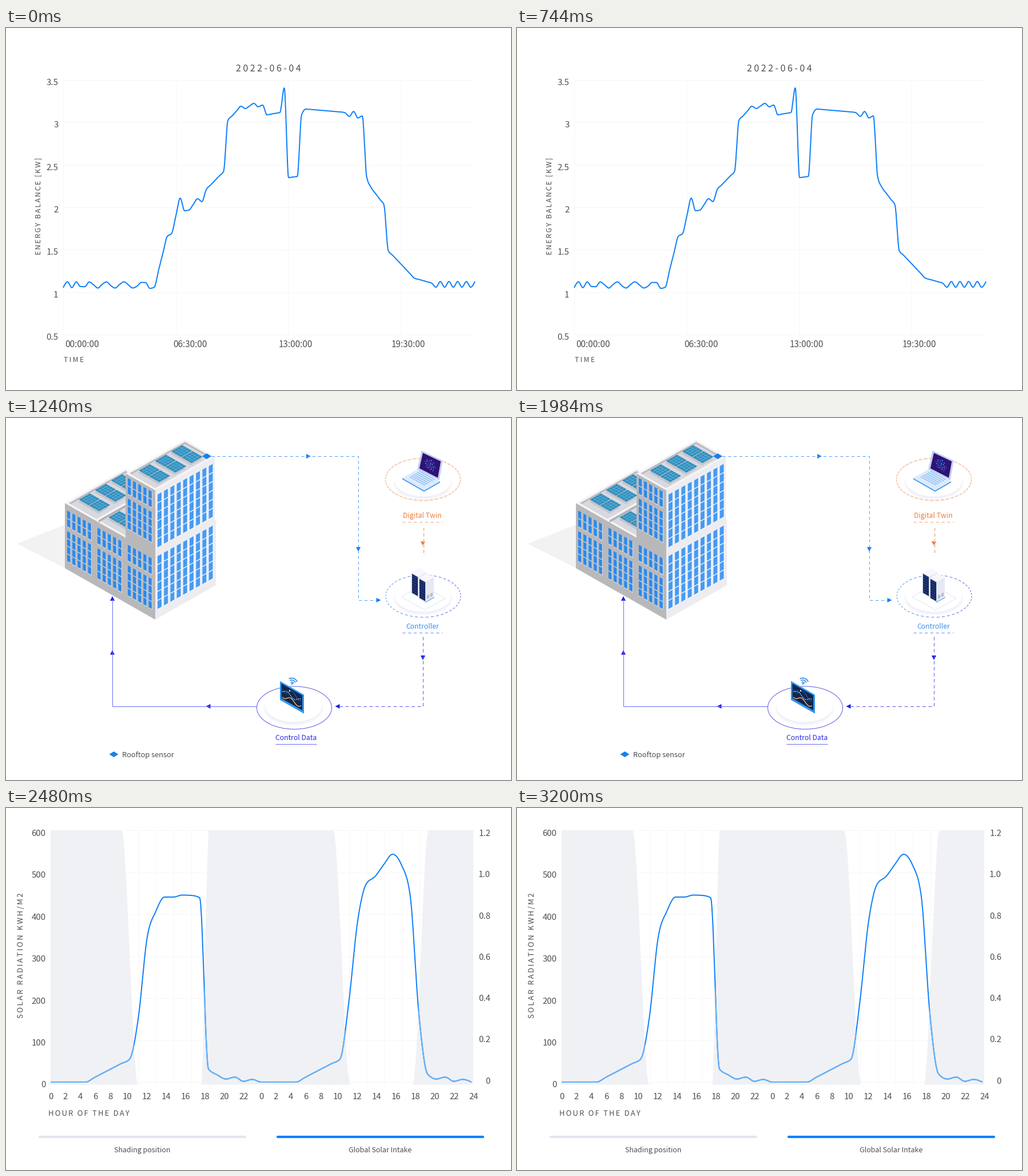
These frames come from a looping animation (883 by 634 pixels, 3.68 s). A matplotlib script:

```python
import math

import numpy as np
import matplotlib.pyplot as plt
from matplotlib.animation import FuncAnimation
from matplotlib.collections import LineCollection, PolyCollection
from matplotlib.patches import Ellipse, PathPatch, Polygon
from matplotlib.path import Path
from matplotlib.textpath import TextPath
from matplotlib.transforms import Affine2D

W, H, DPI = 883, 634, 100
STEP_MS, FRAMES = 40, 92
CUTS = (31, 62)          # first frame of the second and third scene
PT = 72 / DPI            # points per pixel
ISO = 0.57               # slope of the slanted edges
FONT = "Noto Sans CJK JP"
INK, GRID = "#4f4f4f", "#f6f6f7"
BLUE, SKY, INDIGO, ORANGE = "#0f80fa", "#4f9ff2", "#2a2ae4", "#ee8a50"

plt.rcParams["font.family"] = FONT
plt.rcParams["font.weight"] = "light"
fig = plt.figure(figsize=(W / DPI, H / DPI), dpi=DPI, facecolor="white")


def scene():
    ax = fig.add_axes([0, 0, 1, 1])
    ax.set_xlim(0, W)
    ax.set_ylim(H, 0)
    ax.axis("off")
    return ax


# ---------- helpers ----------

def line(ax, pts, color, w=1.0, dash=None, cap="butt", **kw):
    x, y = zip(*pts)
    style = "-" if dash is None else (0, tuple(d / w for d in dash))
    return ax.plot(x, y, color=color, lw=w * PT, ls=style, dash_capstyle=cap,
                   solid_capstyle=cap, solid_joinstyle="round", **kw)[0]


def poly(ax, pts, color, edge="none", w=0.0):
    ax.add_patch(Polygon(pts, closed=True, fc=color, ec=edge, lw=w * PT,
                         joinstyle="round"))


def oval(ax, x, y, w, h, color, **kw):
    ax.add_patch(Ellipse((x, y), w, h, fc=color, lw=0, **kw))


def label(ax, x, y, text, size=15, ha="left", color=INK):
    ax.text(x, y, text, fontsize=size * PT, ha=ha, va="baseline", color=color)


def spaced(ax, x, y, text, size, gap, upright=False):
    """Letter-spaced text starting at the baseline point (x, y)."""
    prop = {"family": FONT, "weight": "light"}

    def reach(s):
        return TextPath((0, 0), s + "|", size=size, prop=prop).get_extents().x1

    place = Affine2D().scale(1, -1)
    if upright:
        place.rotate_deg(-90)
    place.translate(x, y)
    for i, ch in enumerate(text):
        if ch == " ":
            continue
        at = reach(text[:i]) - reach("") + i * gap
        glyph = TextPath((at, 0), ch, size=size, prop=prop)
        ax.add_patch(PathPatch(place.transform_path(glyph), fc=INK, lw=0, snap=False))


def monotone(x, y, n=14):
    """Monotone cubic curve through the points."""
    x, y = np.asarray(x, float), np.asarray(y, float)
    h, s = np.diff(x), np.diff(y) / np.diff(x)
    p = (s[:-1] * h[1:] + s[1:] * h[:-1]) / (h[:-1] + h[1:])
    m = (np.sign(s[:-1]) + np.sign(s[1:])) * np.minimum(
        np.minimum(abs(s[:-1]), abs(s[1:])), 0.5 * abs(p))
    m = np.r_[(3 * s[0] - m[0]) / 2, m, (3 * s[-1] - m[-1]) / 2]
    t = np.linspace(0, 1, n, endpoint=False)[None, :]
    a, b, d = y[:-1, None], y[1:, None], h[:, None]
    ys = (a * (1 + 2 * t) * (1 - t) ** 2 + d * m[:-1, None] * t * (1 - t) ** 2
          + b * t * t * (3 - 2 * t) + d * m[1:, None] * t * t * (t - 1))
    xs = x[:-1, None] + d * t
    return list(zip(np.r_[xs.ravel(), x[-1]], np.r_[ys.ravel(), y[-1]]))


def arrow(ax, x, y, turn, color, r=4.0):
    """Triangle pointing right, turned clockwise by quarter turns."""
    c, s = math.cos(turn * math.pi / 2), math.sin(turn * math.pi / 2)
    pts = [(r, 0), (-r, r), (-r, -r)]
    poly(ax, [(x + a * c - b * s, y + a * s + b * c) for a, b in pts], color)


RIGHT, DOWN, LEFT, UP = range(4)


# ---------- energy balance chart ----------

def balance():
    """Height of the curve at each quarter of an hour."""
    q = np.arange(96)
    keys = [(20, 456), (21, 454), (24, 365), (25, 360), (27, 298), (28, 320),
            (29, 319), (31, 299), (32, 304), (33, 283), (37, 251), (38, 162),
            (41, 137), (42, 141), (44, 132), (45, 138), (46, 135), (47, 152),
            (50, 148), (51, 105), (52, 262), (54, 260), (55, 152), (56, 142),
            (64, 147), (69, 154), (70, 260), (71, 279), (74, 310), (75, 390),
            (81, 438), (86, 449)]
    base = np.interp(q, *zip(*keys))
    night = 450 - 5.5 * np.cos(2 * np.pi * 0.585 * abs(q - 1) ** 0.75)
    flicker = 5 * (-1.0) ** q * ((q > 85) | (q > 65) & (q < 69))
    return np.where(q < 20, night, base + flicker)


def energy_chart():
    ax = scene()
    for i in range(4):
        x = 100 + 196.7 * i
        line(ax, [(x, 91), (x, 537)], GRID)
        hours = 6.5 * i
        text = f"{int(hours):02d}:{int(hours % 1 * 60):02d}:00"
        label(ax, x + 3.5 - 8 * (i > 0) - 12 * (i > 1), 559, text, 15.2)
    for i in range(7):
        y = 91 + 74.3 * i
        line(ax, [(100, y), (820, y)], GRID)
        label(ax, 91.5, y + 9, f"{3.5 - 0.5 * i:g}", ha="right")
    spaced(ax, 402, 76, "2022-06-04", 16, 3.5)
    spaced(ax, 60, 398, "ENERGY BALANCE [KW]", 12.3, 2.1, upright=True)
    spaced(ax, 101, 585, "TIME", 12, 2.5)
    ys = balance()
    line(ax, monotone(np.linspace(100, 820, len(ys)), ys), BLUE, 2)
    return ax


# ---------- solar radiation chart ----------

def shade(left, right):
    """Shaded block; each side is (top x, bottom x)."""
    top, low = 39, 484.5
    (lt, lb), (rt, rb) = left, right
    dl, dr = (lb - lt) / 3, (rb - rt) / 3
    pts = [(lt, top), (rt, top), (rt + dr, top), (rb - dr, low), (rb, low),
           (lb, low), (lb - dl, low), (lt + dl, top), (lt, top)]
    side = [Path.LINETO] + [Path.CURVE4] * 3
    return Path(pts, [Path.MOVETO] + side + side)


def radiation():
    """Height of the curve at each hour of two days."""
    k = np.arange(5)
    night = np.full(5, 480)
    dawn = 472 - 8 * k
    dusk = 470 + 2 * k - 2.7 * (-1.0) ** k
    plateau = [368, 228, 181, 156, 156, 152.5, 153, 157, 457]
    peak = [342, 200, 133, 120, 99, 81, 99, 152, 360, 466]
    return np.r_[night, dawn, plateau, dusk, night, dawn, peak, dusk[1:], 480]


def solar_chart():
    ax = scene()
    for i in range(25):
        x = 78 + 30.7 * i
        line(ax, [(x, 39), (x, 484)], GRID)
    for i in range(7):
        y = 39 + 73.5 * i
        line(ax, [(78, y), (817, y)], GRID)
        label(ax, 69.5, 49 + 73.4 * i, str(600 - 100 * i), ha="right")
        text = f"{1.2 - 0.2 * i:.1f}" if i < 6 else "0"
        label(ax, 847, 49 + 72.3 * i, text, ha="right")

    x, before = 78, None
    for hour in [*range(0, 24, 2), *range(0, 25, 2)]:
        wide = 17 if hour > 9 else 9
        if before:
            x += 17 + (before + wide) / 2
        label(ax, x, 510, str(hour), ha="center")
        before = wide
    spaced(ax, 29, 369, "SOLAR RADIATION KWH/M2", 13, 2.55, upright=True)
    spaced(ax, 74, 539, "HOUR OF THE DAY", 13, 2.2)

    ys = radiation()
    curve = monotone(78 + 15.33 * np.arange(len(ys)), ys)
    shades = (shade((78, 78), (202, 231)), shade((355, 341), (572, 602)),
              shade((739, 711), (817, 817)))
    line(ax, curve, BLUE, 2, zorder=3)
    for path in shades:
        ax.add_patch(PathPatch(path, fc="#eff0f4", lw=0, alpha=0.92, zorder=2.5))
        pale = line(ax, curve, "#69b1f6", 2.2, zorder=4)
        pale.set_clip_path(path, ax.transData)

    for x, color, text in ((57, "#e3e6ef", "Shading position"),
                           (473, BLUE, "Global Solar Intake")):
        line(ax, [(x + 2, 576), (x + 361, 576)], color, 4.2, cap="round")
        label(ax, x + 181.5, 603, text, 12.5, ha="center")
    return ax


# ---------- isometric shapes ----------

def wall(x, y, w, h, slope=ISO):
    """Upright face whose top edge starts at (x, y)."""
    return [(x, y), (x + w, y + slope * w), (x + w, y + slope * w + h), (x, y + h)]


def flat(x, y, a, b):
    """Level face from its left corner: a runs down right, b runs up right."""
    return [(x, y), (x + a, y + ISO * a), (x + a + b, y + ISO * (a - b)),
            (x + b, y - ISO * b)]


def box(ax, x, y, a, b, h, left, right, top):
    poly(ax, wall(x, y, a, h), left)
    poly(ax, wall(x + a, y + ISO * a, b, h, -ISO), right)
    poly(ax, flat(x, y, a, b), top)


def roof(ax, x, y, a, b, rim=3.6, drop=3):
    """Sunken roof floor behind a pale rim."""
    x, a, b = x + 2 * rim, a - 2 * rim, b - 2 * rim
    poly(ax, flat(x, y, a, b), "#b9babf")
    poly(ax, flat(x + drop, y + ISO * drop, a - drop, b - drop), "#d8d9df")


def windows(ax, x, y, n, pitch, w, h, floors, slope, color, frame):
    """Columns of windows on a slanted wall."""
    step = h / floors
    frames, panes = [], []
    for k in range(n):
        left, top = x + k * pitch, y + slope * k * pitch
        frames.append(wall(left, top, w + 1.2, h, slope))
        panes += [wall(left, top + f * step, w, step - 1.5, slope)
                  for f in range(floors)]
    for cells, fill in ((frames, frame), (panes, color)):
        ax.add_collection(PolyCollection(cells, facecolors=fill, linewidths=0, zorder=1))


def panel_pairs(ax, x, y, n):
    """Pairs of solar panels, each pair further up the roof."""
    a, b, gap = 16.5, 18.5, 18.3
    for k in reversed(range(n)):
        px, py = x + 28.3 * k, y - 16.7 * k
        poly(ax, flat(px - 2, py + 4, a + gap + 1, b), "#c3c5cd")
        for cx in (px, px + gap):
            cy = py + ISO * (cx - px)
            poly(ax, flat(cx, cy, a, b), "#2d8fc0", "#1f76a4", 0.5)
            for t in (0.25, 0.5, 0.75):
                for strip in (flat(cx, cy, a * t, b)[1:3], flat(cx, cy, a, b * t)[2:]):
                    line(ax, strip, "#7cc0de", 0.6, zorder=1)


# ---------- building and control loop ----------

def building(ax):
    grey, white, rim = "#b8b8bb", "#ededf1", "#f4f4f6"
    poly(ax, [(19, 220), (103, 187), (103, 263)], "#f2f2f2")

    box(ax, 103, 149, 158, 106, 114, grey, white, rim)
    roof(ax, 103, 149, 106, 106)
    panel_pairs(ax, 128, 143, 3)
    poly(ax, wall(158, 177, 51, 4, -ISO), rim)
    poly(ax, wall(162, 179, 47, 4, -ISO), "#b0b1b6")
    panel_pairs(ax, 180, 174, 1)

    box(ax, 209, 97, 52, 104, 226, grey, white, rim)
    roof(ax, 209, 97, 52, 104)
    panel_pairs(ax, 233, 92, 3)

    for x, y in ((107, 162), (160, 192), (213, 222), (213, 105)):
        for top, h, floors in ((y, 29, 2), (y + 36, 54, 4)):
            windows(ax, x, top, 5, 9.1, 5.4, h, floors, ISO, "#2b89eb", "#d3d3d6")
    for y in (134, 242):
        windows(ax, 265, y, 9, 11.2, 7, 94, 6, -0.555, "#479bf3", "#fafafc")


def diamond(ax, x, y):
    poly(ax, [(x - 8, y), (x, y - 5), (x + 8, y), (x, y + 5)], "#1580ee")


def disc(ax, x, y):
    for k in range(7):
        oval(ax, x, y + 4, 104 - 2 * k, 60 - 2 * k, "#cdd4f8", alpha=0.06)
    oval(ax, x, y, 98, 55, "white")


def dashed_ring(ax, x, y, start, end, w=1.0, shift=0.0, n=44):
    """Dashed ellipse whose colour runs from left to right."""
    start, end = np.array(start) / 255, np.array(end) / 255
    arcs, colors = [], []
    for k in range(n):
        t = (k + shift + np.linspace(0, 0.55, 6)) * 2 * math.pi / n
        arcs.append(np.c_[x + 65.5 * np.cos(t), y + 37 * np.sin(t)])
        mix = (1 + math.cos(t[3])) / 2
        colors.append(tuple(start + (end - start) * mix))
    ax.add_collection(LineCollection(arcs, colors=colors, linewidths=w * PT, zorder=1))


def laptop(ax):
    box(ax, 693, 105, 38, 28, 2.5, "#4fa2f2", "#4fa2f2", "#dcebfc")
    for k in range(6):
        x, y = 706 + 3.4 * k, 103 - 1.95 * k
        line(ax, [(x, y), (x + 27, y + 15)], "#7cb8f3", 1.6, dash=(2.6, 0.8), zorder=1)
    screen = np.array([(727, 58), (763, 75), (757, 108), (720, 89)])
    mid = screen.mean(axis=0)
    poly(ax, screen, "#c6d2f5", "#9fb2ea", 0.7)
    poly(ax, mid + 0.87 * (screen - mid), "#2f1274")
    for k in range(26):
        r, t = 1.9 * math.sqrt(k), 2.4 * k
        x, y = r * math.cos(t), r * math.sin(t)
        oval(ax, mid[0] + x, mid[1] + y + 0.4 * x, 2, 2,
             ("#2f7de0", "#3d4fd0", "#36b4e6")[k % 3])


def servers(ax):
    poly(ax, flat(691, 313, 41, 36), "white", "#e3e6f8", 1)
    for x, y in ((709, 271), (722, 280)):
        box(ax, x, y, 12, 14, 36, "#c9cfe6", "#e6e9f4", "#f6f7fc")
        poly(ax, wall(x + 1, y + 2, 10, 33), "#16235a")
        for k in range(7):
            top = y + 5.5 + 4.4 * k
            line(ax, [(x + 2, top), (x + 10, top + 4.5)], "#3f78c8", 0.9,
                 dash=(1.6, 1.2), zorder=1)
    for k in range(2):
        poly(ax, wall(736 + 6 * k, 311 - 3.4 * k, 4, 6, -ISO), "#b4bad0")
    line(ax, [(733, 323), (749, 314)], "#6aa9ee", 1.2, zorder=1)


def tablet(ax):
    poly(ax, wall(479.5, 461.5, 41, 32), "#2f95ee", "#2f95ee", 1)
    poly(ax, wall(481.5, 465, 36.5, 26), "#10264f")
    t = np.linspace(0, 1, 40)
    waves = ((474, 4.5, 0.2, "#3f7fd0", 0.7, None),
             (478, 3.5, 2.6, "white", 0.9, (2.2, 1.2)),
             (486, 3.5, 0.9, "#f2b56a", 1.4, None))
    for y, amp, phase, color, w, dash in waves:
        ys = y + 18 * t + amp * np.sin(8.5 * t + phase)
        line(ax, list(zip(483 + 33 * t, ys)), color, w, dash, zorder=1)
    oval(ax, 496, 477.5, 2.4, 2.4, "white")

    a = np.radians(np.linspace(-118, -22, 14))
    for r in (3.5, 7, 10.5):
        arc = zip(499.5 + r * np.cos(a), 466 + r * np.sin(a))
        line(ax, list(arc), "#2486e8", 1.6)
    oval(ax, 500, 465.5, 2.8, 2.8, "#2486e8")


def caption(ax, x, y, text, color, rule, half, dash=None):
    label(ax, x, y, text, 12.2, "center", color)
    line(ax, [(x - half, y + 6.5), (x + half, y + 6.5)], rule, 1, dash)


def control_loop():
    ax = scene()
    building(ax)
    dash = (5.2, 4.6)

    # sensor to controller
    diamond(ax, 351, 67)
    line(ax, [(359, 67), (615.5, 67), (615.5, 319), (648, 319)], SKY, 1, dash)
    for x, y, turn in ((529, 67, RIGHT), (616, 230, DOWN), (651.5, 319, RIGHT)):
        arrow(ax, x, y, turn, BLUE)

    # digital twin
    peach = (251, 218, 202)
    dashed_ring(ax, 729, 107.5, peach, peach, 2.2, 0.25)
    dashed_ring(ax, 729, 107.5, (245, 182, 153), (245, 182, 153))
    disc(ax, 729, 110)
    laptop(ax)
    label(ax, 728, 174, "Digital Twin", 12.2, "center", "#fbe0d2")
    caption(ax, 728, 175.5, "Digital Twin", ORANGE, "#f2a77e", 35, dash)
    line(ax, [(729.5, 192), (729.5, 240)], "#fadccf", 3, (5.5, 4))
    line(ax, [(729.5, 192), (729.5, 240)], "#f5bfa4", 1, dash)
    arrow(ax, 729, 220, DOWN, "#ea7b38")

    # controller
    dashed_ring(ax, 729.5, 312, (75, 163, 243), (98, 92, 222))
    disc(ax, 729, 312)
    servers(ax)
    caption(ax, 728, 369, "Controller", "#3a90ee", "#6f8aec", 35, dash)
    line(ax, [(729, 383), (729, 505), (583, 505)], "#5b5bec", 1, (6, 4.5))

    # control data
    ax.add_patch(Ellipse((504, 507.5), 131, 75, fc="none", ec="#5c5cea", lw=PT))
    disc(ax, 503, 505)
    tablet(ax)
    caption(ax, 507, 564, "Control Data", INDIGO, "#6a6aee", 36)
    line(ax, [(438, 505), (186, 505), (186, 318)], "#6c6cf0", 1)
    for x, y, turn in ((729, 420, DOWN), (579.5, 505, LEFT), (353.5, 505, LEFT),
                       (186, 410.5, UP), (186, 316, UP)):
        arrow(ax, x, y, turn, "#1c1cea")

    diamond(ax, 188.5, 589)
    label(ax, 203, 594, "Rooftop sensor", 12.9)
    return ax


scenes = [energy_chart(), control_loop(), solar_chart()]


def update(frame):
    current = sum(frame >= cut for cut in CUTS)
    for i, ax in enumerate(scenes):
        ax.set_visible(i == current)
    return scenes


anim = FuncAnimation(fig, update, frames=FRAMES, interval=STEP_MS,
                     repeat=True, repeat_delay=0, blit=False)
plt.show()
```
